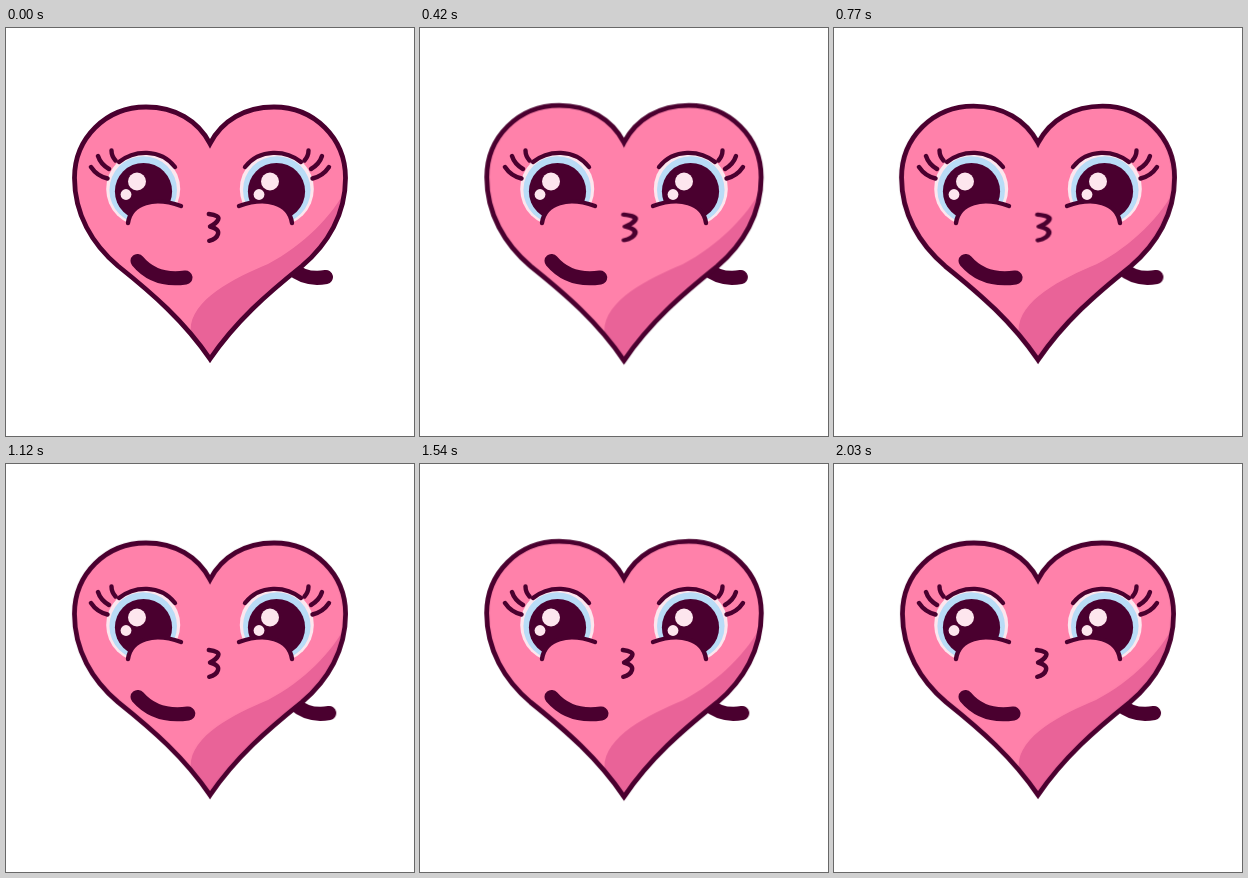
Write an HTML page that moves like this. It is 408x408 px and loops after 2.1 s.

```html
<!DOCTYPE html>
<html lang="en">
<head>
<meta charset="utf-8">
<title>Kissing heart</title>
<style>
  html, body { margin: 0; width: 100%; height: 100%; overflow: hidden; background: #fff; }
  svg { display: block; width: 100vw; height: 100vh; }

  .line { fill: none; stroke: #4a002f; stroke-width: 4.4; stroke-linecap: round; stroke-linejoin: round; }
  .arm { stroke-width: 14; }
  .outline { fill: none; stroke: #4a002f; stroke-width: 4.8; stroke-linejoin: miter; }

  .heart { transform-origin: 204px 206px; animation: pulse 1050ms ease-in-out infinite; }
  .front { transform-origin: 124px 240px; animation: stretch 2100ms ease-in-out infinite; }
  .back { animation: reach 2100ms ease-in-out infinite; }
  .mouth { transform-origin: 202px 199px; animation: pucker 2100ms ease-in-out infinite; }
  .puff { stroke-dasharray: 1 2; animation: puff 2100ms linear infinite; }

  @keyframes pulse { 50% { transform: scale(1.0135); } }
  @keyframes stretch { 57% { transform: scaleX(1.045); } }
  @keyframes reach { 57% { transform: translateX(3.3px); } }
  @keyframes pucker {
    0%, 6.7% { transform: none; }
    26.7%, 31% { transform: translateX(1px) scale(1.27, .94); }
    46.7%, 100% { transform: none; }
  }
  @keyframes puff {
    0%, 21.6% { stroke-dashoffset: 1; visibility: hidden; }
    21.7% { stroke-dashoffset: .8; visibility: visible; }
    26%, 32% { stroke-dashoffset: 0; visibility: visible; }
    36.6% { stroke-dashoffset: -.8; visibility: visible; }
    36.7%, 100% { stroke-dashoffset: -1; visibility: hidden; }
  }
</style>
</head>
<body>
<svg viewBox="0 0 408 408" aria-label="A pink heart blowing a kiss">
  <defs>
    <path id="shape" d="M204 115.6 C192 92.5 169 79 140 79 C100 79 68.5 110 68.5 150
      C68.5 186 86 216 112 238 C147 266 178 293 204 331
      C230 293 261 266 296 238 C322 216 339.5 186 339.5 150
      C339.5 110 308 79 268 79 C239 79 216 92.5 204 115.6Z"/>
    <clipPath id="inside"><use href="#shape"/></clipPath>
    <clipPath id="aboveCheek">
      <path d="M90 110 H185 V180 L175 178 C149 168.5 125 174 122 195 H90Z"/>
    </clipPath>
    <g id="eye">
      <g clip-path="url(#aboveCheek)">
        <circle cx="137.2" cy="161" r="37" fill="#fde6ee"/>
        <circle cx="137.2" cy="162" r="33.8" fill="#b9dcf7"/>
        <circle cx="137.5" cy="163.5" r="28.6" fill="#4a002f"/>
      </g>
      <path class="line" d="M122 195 C125 174 149 168.5 175 178"/>
      <path class="line" d="M113 134 C128 122 154 120 169 139"/>
      <path class="line" d="M105.5 122.5 Q105.5 128 109.5 132.5 M92 128 Q94.5 136 103 141 M85 139 Q91 148 101.5 150.5"/>
    </g>
    <g id="glints" fill="#fde6ee">
      <circle cx="131" cy="153.5" r="9"/>
      <circle cx="120" cy="166.5" r="5.4"/>
    </g>
  </defs>

  <path class="line arm back" d="M284 239 Q299 253 320 249"/>

  <g class="heart">
    <use href="#shape" fill="#ff81aa"/>
    <path clip-path="url(#inside)" fill="#e96398"
      d="M340 161 C326 188 298 217 262 236 C226 251 180 274 185 307 L204 340 H350 V161Z"/>
    <use href="#shape" class="outline"/>
  </g>

  <use href="#eye"/>
  <use href="#eye" transform="translate(408 0) scale(-1 1)"/>
  <use href="#glints"/>
  <use href="#glints" x="133"/>

  <path class="line mouth" d="M202.8 186 Q214 187.5 212.2 191.5 Q210.5 195.5 204 198.5
    Q213.5 201 212 206 Q210.5 211 203.2 212.8"/>
  <g class="line puff">
    <path pathLength="1" d="M229.5 188.5 L238.5 184.5"/>
    <path pathLength="1" d="M231 197 L242 195.5"/>
    <path pathLength="1" d="M229.5 204.5 L239.5 208"/>
  </g>

  <path class="line arm front" d="M131.5 233 Q149 254 179.5 249.5"/>
</svg>
</body>
</html>
```
